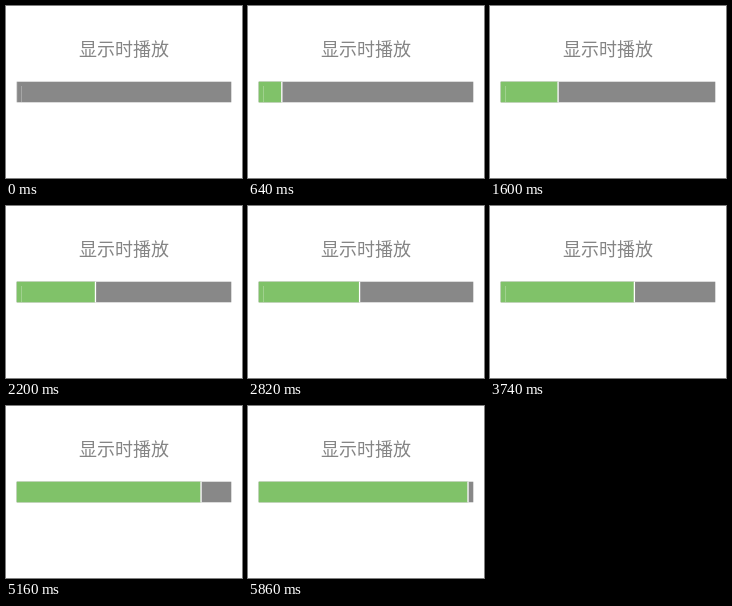
Animation of 236x172 px, one loop 5.88 s. Source, as an HTML page:

```html
<!DOCTYPE html>
<html lang="zh-CN">
<head>
<meta charset="utf-8">
<style>
  html, body { margin: 0; width: 100%; height: 100%; overflow: hidden; background: #fff; }
  svg { display: block; }
  text { font: 18px "Noto Sans CJK SC", "Noto Sans CJK", sans-serif; fill: #858585; }
</style>
</head>
<body>
<svg width="236" height="172" viewBox="0 0 236 172">
  <text x="118" y="49.8" text-anchor="middle">显示时播放</text>
  <rect x="10.7" y="75.7" width="214.6" height="20.6" fill="#888"/>
  <rect id="played" x="10.7" y="75.7" height="20.6" fill="#80c269"/>
  <rect id="tick" x="15" y="80" width="1" height="16" fill="#fff" opacity=".25"/>
  <rect id="head" y="75.7" width="1.3" height="20.6" fill="#fff"/>
</svg>
<script>
  const LOOP = 5880, STEP = 20, DURATION = 6000, LEFT = 11, WIDTH = 214;
  const played = document.getElementById('played');
  const tick = document.getElementById('tick');
  const head = document.getElementById('head');
  const start = performance.now();

  function draw() {
    const time = (performance.now() - start) % LOOP;
    const t = Math.floor(time / STEP) * STEP;
    const done = WIDTH * t / DURATION;
    played.setAttribute('width', done);
    head.setAttribute('x', LEFT + done - 0.65);
    head.setAttribute('opacity', t ? 1 : 0.15);
    tick.setAttribute('visibility', t < 4820 ? 'visible' : 'hidden');
    requestAnimationFrame(draw);
  }
  draw();
</script>
</body>
</html>
```
